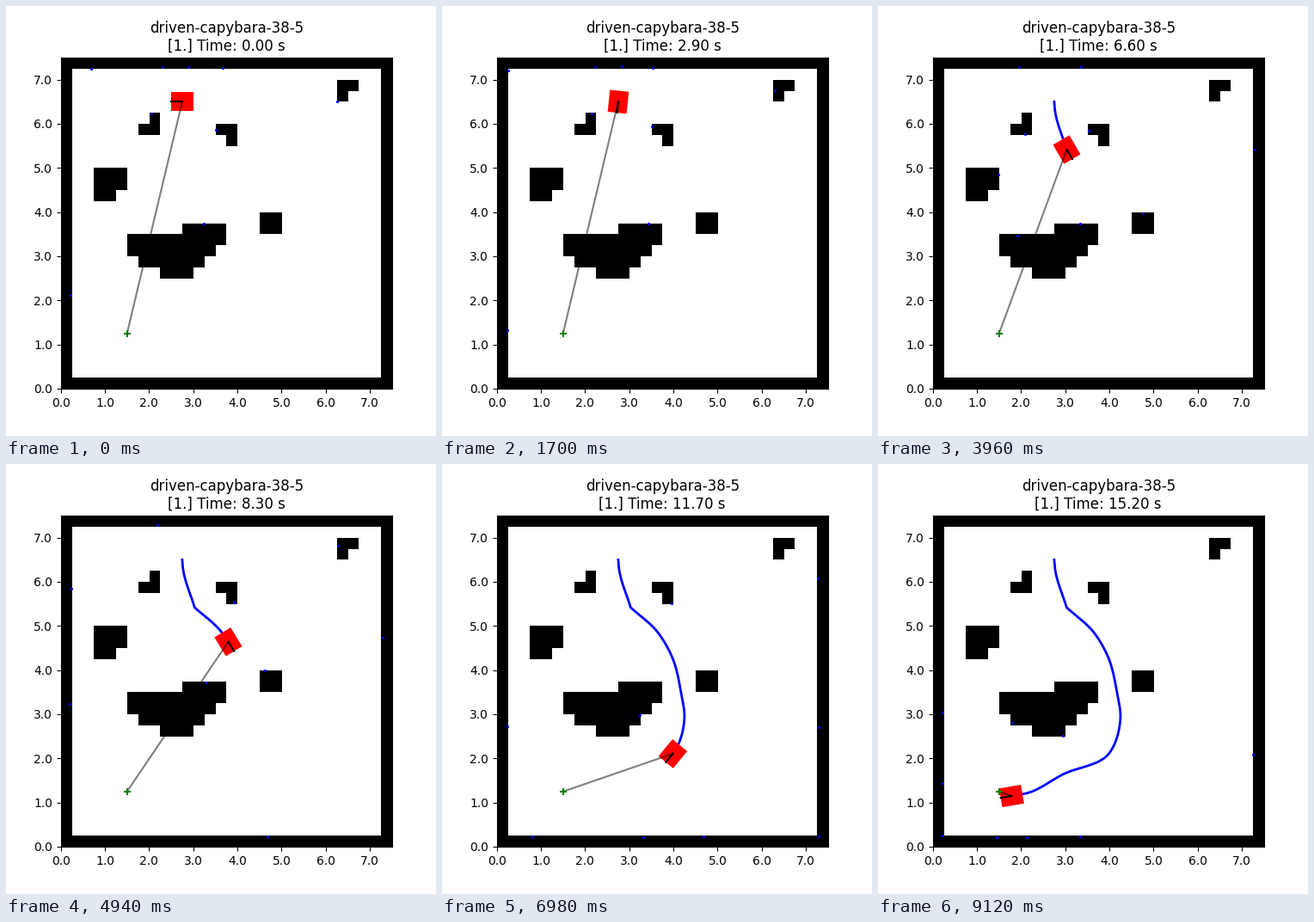
Write a matplotlib script that moves like this. It is 500 by 500 pixels and loops after 9.22 s.

```python
import numpy as np
import matplotlib.pyplot as plt
from matplotlib.animation import FuncAnimation

STEPS = 153          # simulation steps of 0.1 s
TICKS = 461          # 20 ms ticks per loop
CELL, SIZE = 0.25, 30
GOAL = np.array([1.5, 1.25])
TURN = 2.96          # degrees per step


def build_map():
    grid = np.ones((SIZE, SIZE))
    grid[1:-1, 1:-1] = 0

    def block(row, col, n, bite=None):
        grid[row:row + n, col:col + n] = 1
        if bite:
            grid[bite] = 0

    block(26, 25, 2, bite=(26, 26))
    block(23, 7, 2, bite=(24, 7))
    block(22, 14, 2, bite=(22, 14))
    block(17, 3, 3, bite=(17, 5))
    block(14, 18, 2)
    # large heap, widening upwards from its lowest row
    for i in range(4):
        grid[10 + i, max(6, 9 - 2 * i):12 + i] = 1
    grid[14, 11:15] = 1
    return grid


def smooth(points, n=1500):
    """Cubic curve through the points, with its arc length."""
    p = np.array(points, float)
    t = np.r_[0, np.cumsum(np.hypot(*np.diff(p, axis=0).T))]
    m = np.gradient(p, t, axis=0)
    u = np.linspace(0, t[-1], n)
    i = np.clip(np.searchsorted(t, u, side="right") - 1, 0, len(t) - 2)
    h = (t[i + 1] - t[i])[:, None]
    w = (u[:, None] - t[i][:, None]) / h
    curve = ((2 * w**3 - 3 * w**2 + 1) * p[i] + (w**3 - 2 * w**2 + w) * h * m[i]
             + (3 * w**2 - 2 * w**3) * p[i + 1] + (w**3 - w**2) * h * m[i + 1])
    s = np.r_[0, np.cumsum(np.hypot(*np.diff(curve, axis=0).T))]
    return curve, s


def along(leg, s):
    curve, arc = leg
    s = np.clip(s, 0, arc[-1])
    return np.array([np.interp(s, arc, curve[:, 0]), np.interp(s, arc, curve[:, 1])])


def travelled(k, start, stop, ramp=8):
    """Fraction of a leg done under a trapezoid speed profile."""
    span = stop - start
    t = np.clip(k - start, 0, span)
    total = span - ramp
    if t < ramp:
        d = t * t / (2 * ramp)
    elif t < span - ramp:
        d = t - ramp / 2
    else:
        d = total - (span - t) ** 2 / (2 * ramp)
    return d / total


LEG1 = smooth([(2.75, 6.5), (2.765, 6.32), (3.03, 5.42)])
LEG2 = smooth([(3.03, 5.42), (3.65, 4.85), (3.96, 4.32), (4.18, 3.45), (4.25, 2.95),
               (3.99, 2.11), (2.95, 1.64), (2.15, 1.218), (1.784, 1.149)])


def pose(k):
    if k < 66:
        pos = along(LEG1, travelled(k, 29.4, 51.5) * LEG1[1][-1])
        head = min(180 + TURN * max(k - 0.6, 0), 285.7)
        head += TURN * max(k - 61.2, 0)
        return pos, np.radians(head)
    s = travelled(k, 65, 152) * LEG2[1][-1]
    dx, dy = along(LEG2, s + 0.1) - along(LEG2, s - 0.1)
    head = np.degrees(np.arctan2(dy, dx)) % 360
    return along(LEG2, s), np.radians(min(head, 300 + TURN * (k - 66)))


def scan(pos, head):
    """Nine beams, marched in small steps up to their range."""
    r = np.arange(0.05, 5.96, 0.05)
    a = head + np.pi + np.radians(40 * np.arange(9))
    x = pos[0] + np.outer(np.cos(a), r)
    y = pos[1] + np.outer(np.sin(a), r)
    col, row = (np.clip(np.floor((v + 1e-9) / CELL).astype(int), 0, SIZE - 1)
                for v in (x, y))
    hit = GRID[row, col] > 0
    hit[:, -1] = True
    beam, first = np.arange(9), hit.argmax(axis=1)
    return x[beam, first], y[beam, first]


GRID = build_map()
POSES = [pose(k) for k in range(STEPS)]
TRACK = np.array([p for p, _ in POSES])
SCANS = [scan(p, h) for p, h in POSES]
BODY = np.array([(0.25, 0.215), (-0.25, 0.215), (-0.25, -0.215), (0.25, -0.215)])

fig, ax = plt.subplots(figsize=(5, 5), dpi=100)
ax.imshow(GRID, cmap="Greys", origin="lower", extent=(0, 7.5, 0, 7.5))
ax.set_xticks(range(8))
ax.set_yticks(range(8))
ax.xaxis.set_major_formatter("{x:.1f}")
ax.yaxis.set_major_formatter("{x:.1f}")
title = ax.set_title("")

trail, = ax.plot([], [], color="blue", lw=2, zorder=2)
robot, = ax.fill(BODY[:, 0], BODY[:, 1], color="red", lw=0, zorder=3)
aim, = ax.plot([], [], color="black", alpha=0.5, lw=1.5, zorder=4)
ax.plot(*GOAL, "+", color="green", mew=1.5, zorder=5)
nose, = ax.plot([], [], color="black", lw=1.5, zorder=6)
dots, = ax.plot([], [], ".", color="blue", ms=2, mew=1.3, zorder=7)
ax.set_xlim(0, 7.5)
ax.set_ylim(0, 7.5)


def update(tick):
    # steps last 20 ms and 100 ms in turn
    k = min(2 * (tick // 6) + (tick % 6 > 0), STEPS - 1)
    pos, head = POSES[k]
    c, s = np.cos(head), np.sin(head)
    title.set_text(f"driven-capybara-38-5\n[1.] Time: {k / 10:.2f} s")
    trail.set_data(TRACK[:k + 1, 0], TRACK[:k + 1, 1])
    robot.set_xy(BODY @ np.array([[c, s], [-s, c]]) + pos)
    aim.set_data([pos[0], GOAL[0]], [pos[1], GOAL[1]])
    nose.set_data([pos[0], pos[0] + 0.25 * c], [pos[1], pos[1] + 0.25 * s])
    dots.set_data(*SCANS[k])
    return title, trail, robot, aim, nose, dots


anim = FuncAnimation(fig, update, frames=TICKS, interval=20, repeat=True,
                     repeat_delay=0, blit=False)
plt.show()
```
